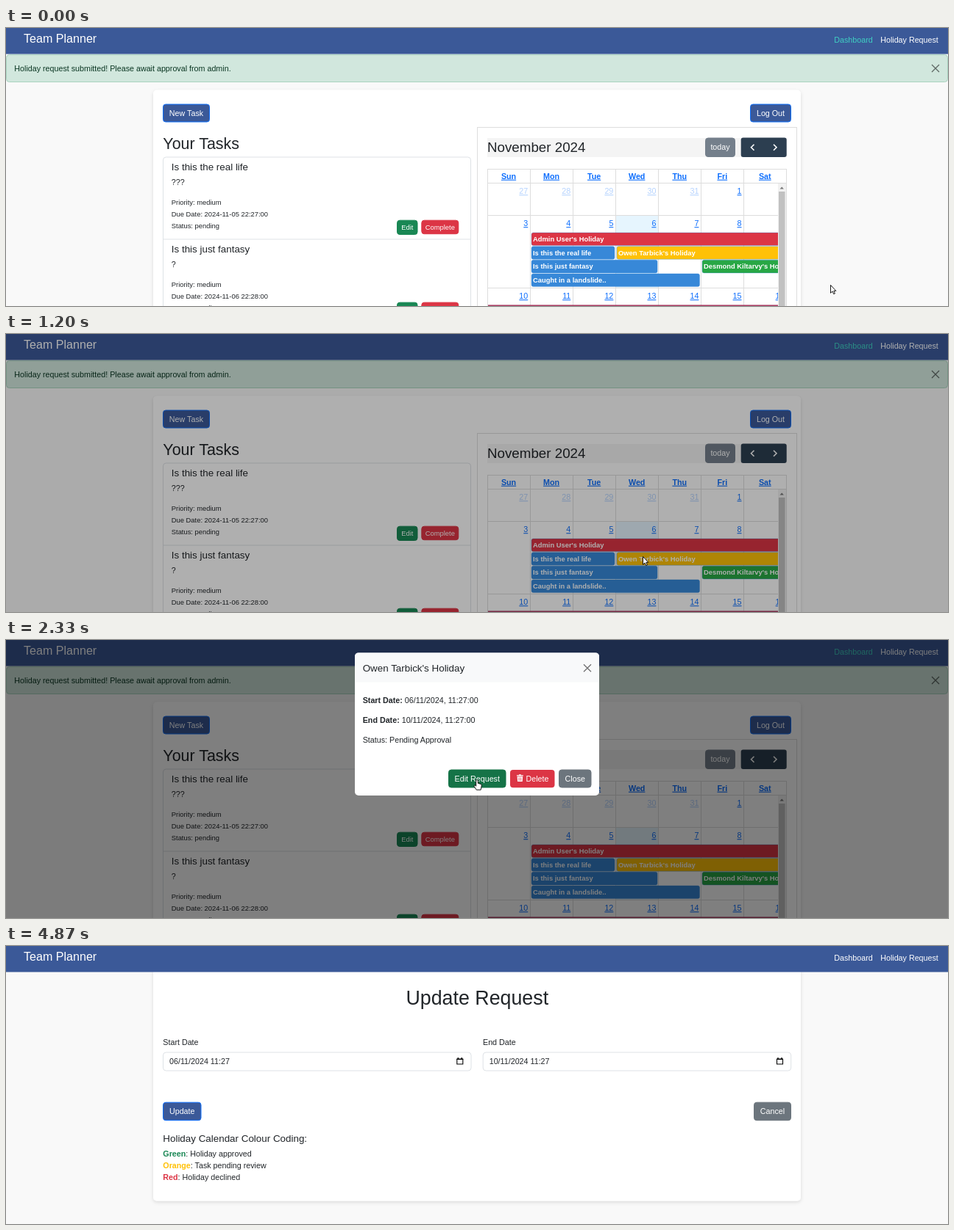
Write an HTML page that moves like this. It is 1280 px wide and 379 px high and loops after 5.27 s.

```html
<!DOCTYPE html>
<html lang="en">
<head>
<meta charset="utf-8">
<title>Team Planner</title>
<style>
html, body { margin: 0; width: 100%; height: 100%; overflow: hidden; background: #f9f9f9; }
svg { display: block; width: 100vw; height: 100vh; font-family: "Liberation Sans", Arial, sans-serif; }
text { white-space: pre; }
</style>
</head>
<body>
<svg id="stage" viewBox="0 0 1280 379"></svg>
<script>
const INK = '#212529', BLUE = '#3b5998', LINK = '#0d6efd', GREEN = '#198754',
      RED = '#dc3545', GREY = '#6c757d', LINE = '#dee2e6', EVENT = '#3788d8';
const BODY = 10.72, SMALL = 9.38, HEAD = 13.4;

// Text whose line box is centred on cy
const text = (x, cy, size, str, fill = INK, more = '') =>
  `<text x="${x}" y="${cy + size * 0.3465}" font-size="${size}" fill="${fill}" ${more}>${str}</text>`;
const rect = (x, y, w, h, fill, r = 0, more = '') =>
  `<rect x="${x}" y="${y}" width="${w}" height="${h}" rx="${r}" fill="${fill}" ${more}/>`;
const path = (d, stroke, width = 1, more = '') =>
  `<path d="${d}" fill="none" stroke="${stroke}" stroke-width="${width}" ${more}/>`;
const bold = (str, fill = INK) => `<tspan font-weight="bold" fill="${fill}">${str}</tspan>`;
const MID = 'text-anchor="middle"', END = 'text-anchor="end"', UNDER = 'text-decoration="underline"';

const button = (x, y, w, h, label, fill, size = BODY, border = fill, id = '') =>
  rect(x + .5, y + .5, w - 1, h - 1, fill, 3.5, `stroke="${border}" ${id}`) +
  text(x + w / 2, y + h / 2, size, label, '#fff', MID);
const cross = (x, y, r) =>
  path(`M${x - r} ${y - r}l${2 * r} ${2 * r}m0 ${-2 * r}l${-2 * r} ${2 * r}`, '#000', 1.3, 'opacity=".55"');
const card = (y, h) => rect(200, y, 880, h, '#fff', 5, 'filter="url(#shade)"');

const navbar = active =>
  rect(0, 0, 1280, 35.5, BLUE) +
  text(24, 14.2, 16.08, 'Team Planner', '#fff') +
  text(1125.3, 16.3, BODY, 'Dashboard', active) +
  text(1188.2, 16.3, BODY, 'Holiday Request', '#fff');

function task(y, title, note, due) {
  return text(224.8, y + 13.7, HEAD, title) +
    text(224.8, y + 34.5, BODY, note) +
    ['Priority: medium', 'Due Date: ' + due, 'Status: pending']
      .map((s, i) => text(224.8, y + 62 + i * 16, SMALL, s)).join('') +
    button(531, y + 85.7, 28.5, 20.3, 'Edit', GREEN, SMALL) +
    button(564.3, y + 85.7, 51, 19.5, 'Complete', RED, SMALL);
}

function calendar() {
  const step = 58.05, col = i => Math.round(654 + i * step) + .5;
  const bar = (x, end, row, fill, label) =>
    rect(x, 279 + row * 18.65, end - x, 17.6, fill, 2.5, `stroke="${EVENT}" stroke-width=".6" stroke-opacity=".6"`) +
    text(x + 2, 287.7 + row * 18.65, SMALL, label, '#fff', 'font-weight="bold"');
  let s = rect(640.5, 135.5, 434, 300, '#fff', 0, 'stroke="#ddd"') +
    rect(654, 150, 407, 26, '#f4f4f4') +
    text(654, 162.7, 18.76, 'November 2024') +
    button(950, 149.5, 41, 26.5, 'today', '#747f8b') +
    rect(998.7, 149.5, 62, 26.5, '#2c3e50', 3) +
    path('M1016.5 158.8l-4 4 4 4M1043 158.8l4 4-4 4', '#fff', 1.6) +
    rect(828.5, 256, 58, 98.5, '#e6f5fe');
  'Sun Mon Tue Wed Thu Fri Sat'.split(' ').forEach((day, i) => {
    s += text(654 + (i + .5) * step, 202, BODY, day, LINK, `${MID} ${UNDER} font-weight="bold"`);
  });
  for (let i = 0; i < 8; i++) s += path(`M${col(i)} 192V379`, '#ddd');
  for (const y of [192.5, 211.5, 255.5, 354.5]) s += path(`M654 ${y}H1061`, '#ddd');
  for (let i = 0; i < 21; i++) {
    const day = i < 5 ? 27 + i : i - 4, row = Math.floor(i / 7);
    s += text(654 + (i % 7 + 1) * step - 2.8, [222.5, 266.5, 365.5][row], BODY, day, LINK,
      `${END} ${UNDER} opacity="${i < 5 ? .3 : 1}"`);
  }
  s += bar(714, 1056, 0, RED, "Admin User's Holiday") +
    bar(714, 827, 1, EVENT, 'Is this the real life') +
    bar(830, 1056, 1, '#ffc107', "Owen Tarbick's Holiday") +
    bar(714, 885, 2, EVENT, 'Is this just fantasy') +
    bar(946, 1056, 2, '#28a745', "Desmond Kiltarvy's Holiday") +
    bar(714, 942.5, 3, EVENT, 'Caught in a landslide..') +
    rect(655, 377.5, 395, 4, '#a83a60');
  // Scrollbar covers the right edge of the grid
  return s + rect(1049, 212, 11, 167, '#f1f1f1') + rect(1050, 223, 8.5, 156, '#c1c1c1') +
    '<path d="M1051.5 219.5h5.4l-2.7-3z" fill="#777"/>' + path('M1060.5 192V379', '#ddd') +
    rect(1061, 192, 13, 187, '#fff');
}

function dashboard() {
  return navbar('#3fcfc2') +
    rect(.5, 36.5, 1279, 37, '#d1e7dd', 4, 'stroke="#a9d3bf"') +
    text(11.3, 54.8, BODY, 'Holiday request submitted! Please await approval from admin.', '#0a3622') +
    cross(1263, 55, 5) +
    card(84.5, 400) +
    button(213, 103.5, 64, 25, 'New Task', BLUE, BODY, LINK) +
    button(1011, 103.5, 56, 25, 'Log Out', BLUE, BODY, LINK) +
    text(213.3, 157.7, 21.44, 'Your Tasks') +
    rect(213.5, 176, 418, 300, '#fff', 4, `stroke="${LINE}"`) +
    path('M214 288H631', LINE) +
    task(176, 'Is this the real life', '???', '2024-11-05 22:27:00') +
    task(288, 'Is this just fantasy', '?', '2024-11-06 22:28:00') +
    calendar();
}

function modal() {
  return rect(474, 17.5, 332, 194.5, '#fff', 5) +
    '<path d="M474 57.5V22.5q0-5 5-5H801q5 0 5 5V57.5z" fill="#f8f9fa"/>' +
    text(484.7, 38, HEAD, "Owen Tarbick's Holiday") +
    cross(790, 38.2, 5) +
    text(484.7, 82.6, BODY, bold('Start Date:') + ' 06/11/2024, 11:27:00') +
    text(484.7, 109.3, BODY, bold('End Date:') + ' 10/11/2024, 11:27:00') +
    text(484.7, 136, BODY, 'Status: Pending Approval') +
    button(601, 176.5, 78.5, 25, 'Edit Request', GREEN, BODY, GREEN, 'id="edit"') +
    rect(685, 177, 60.5, 24.3, RED, 4) +
    text(706.5, 189, BODY, 'Delete', '#fff') +
    '<path d="M694 184.3h2.6l.7-1h2.2l.7 1h2.6v1.3h-8.8zM694.6 186.3h7.6l-.5 6.8h-6.6z" fill="#fff"/>' +
    path('M696.7 187.5v4.4m1.7-4.4v4.4m1.7-4.4v4.4', RED, .6) +
    button(751, 176.5, 44.5, 25, 'Close', GREY);
}

function form() {
  const field = (x, label, date) =>
    text(x, 131.2, BODY, label) +
    rect(x + .2, 145, 418.5, 25, '#fff', 4, `stroke="${LINE}"`) +
    text(x + 8.7, 157.5, BODY, date) +
    path(`M${x + 399.5} 154.5h8v6.5h-8z`, '#000', 1.1) +
    path(`M${x + 399} 154.2h9M${x + 401} 152v2m5-2v2`, '#000', 1.3);
  const key = (y, name, fill, note) => text(213.3, y, BODY, bold(name, fill) + ': ' + note);
  return card(30, 317.5) + navbar('#fff') +
    text(640.3, 70.5, 26.8, 'Update Request', INK, MID) +
    field(213.3, 'Start Date', '06/11/2024 11:27') +
    field(648, 'End Date', '10/11/2024 11:27') +
    button(213, 212.7, 52.5, 25.5, 'Update', BLUE, BODY, LINK) +
    button(1016, 212.7, 51, 25.5, 'Cancel', GREY) +
    text(213.3, 262.3, HEAD, 'Holiday Calendar Colour Coding:') +
    key(283.4, 'Green', GREEN, 'Holiday approved') +
    key(299.4, 'Orange', '#ffc107', 'Task pending review') +
    key(315.4, 'Red', RED, 'Holiday declined');
}

const outline = 'fill="#fff" stroke="#000" stroke-width=".9" stroke-linejoin="round"';
document.getElementById('stage').innerHTML =
  `<defs><filter id="shade" x="-5%" y="-5%" width="110%" height="115%">
    <feDropShadow dx="0" dy="2" stdDeviation="2.5" flood-opacity=".12"/></filter></defs>` +
  rect(0, 0, 1280, 379, '#f9f9f9') +
  `<g id="board">${dashboard()}${rect(0, 0, 1280, 379, '#000', 0, 'id="dim"')}<g id="modal">${modal()}</g></g>` +
  `<g id="form">${form()}</g>` +
  `<g id="cursor"><path id="arrow" d="M.5 .5V11.3L3 9 4.7 12.7 6.4 12 4.8 8.4H7.8Z" ${outline}/>
   <path id="hand" d="M-1.3 1.4Q0-.7 1.3 1.4V5.3L5.2 6.4Q6.5 7 6.2 9L5.2 14.3H-.7L-3.9 9.6Q-4.2 7.8-2.6 8.1L-1.3 9.2Z" ${outline}/></g>`;

const el = id => document.getElementById(id);
const [board, dim, dialog, edit, page, cursor, arrow, hand] =
  ['board', 'dim', 'modal', 'edit', 'form', 'cursor', 'arrow', 'hand'].map(el);

const LOOP = 5270, FPS = 15;
// Cursor route: tick, x, y
const route = [
  [0, 1120, 350], [1, 1111, 346], [3, 1050, 312], [5, 960, 272], [6, 922, 264], [7, 896, 285],
  [8, 901, 307], [12, 860, 303], [14, 865, 303], [23, 865, 303], [24, 859, 302], [25, 845, 296],
  [28, 740, 240], [31, 655, 200], [32, 648, 203], [33, 645, 198], [34, 640, 192], [35, 640, 190],
  [43, 640, 190], [44, 639.5, 189.5], [65, 639.5, 189.5], [67, 600, 198], [70, 330, 284],
  [72, 38, 368], [73, -40, 420], [79, -40, 420]
];
const clamp = v => Math.max(0, Math.min(1, v));

function along(n) {
  const i = route.findIndex(p => p[0] > n), a = route[i - 1], b = route[i] || a;
  const k = (n - a[0]) / (b[0] - a[0]);
  return [a[1] + (b[1] - a[1]) * k, a[2] + (b[2] - a[2]) * k];
}

function draw(now) {
  const n = Math.min(78, Math.floor((now % LOOP) * FPS / 1000 + .1));
  const ms = n * 1000 / FPS;
  const updated = n >= 43, pointing = n >= 33 && n < 45;
  board.style.display = updated ? 'none' : '';
  page.style.display = updated ? '' : 'none';

  dim.setAttribute('opacity', .5 * clamp((ms - 1106) / 150));
  dialog.setAttribute('opacity', clamp((ms - 1270) / 150));
  const left = Math.pow(1 - clamp((ms - 1270) / 300), 1.7);
  dialog.setAttribute('transform', `translate(0 ${-33.5 * left})`);

  const hover = clamp((n - 32) / 3);
  const mix = (a, b) => Math.round(a + (b - a) * hover);
  const green = n === 42 ? '#146c43' : `rgb(${mix(25, 21)},${mix(135, 115)},${mix(84, 71)})`;
  edit.setAttribute('fill', green);
  edit.setAttribute('stroke', green);

  const [x, y] = along(n);
  cursor.setAttribute('transform', `translate(${x} ${y})`);
  arrow.style.display = pointing ? 'none' : '';
  hand.style.display = pointing ? '' : 'none';
}

const start = performance.now();
function loop() {
  draw(performance.now() - start);
  requestAnimationFrame(loop);
}
loop();
</script>
</body>
</html>
```
